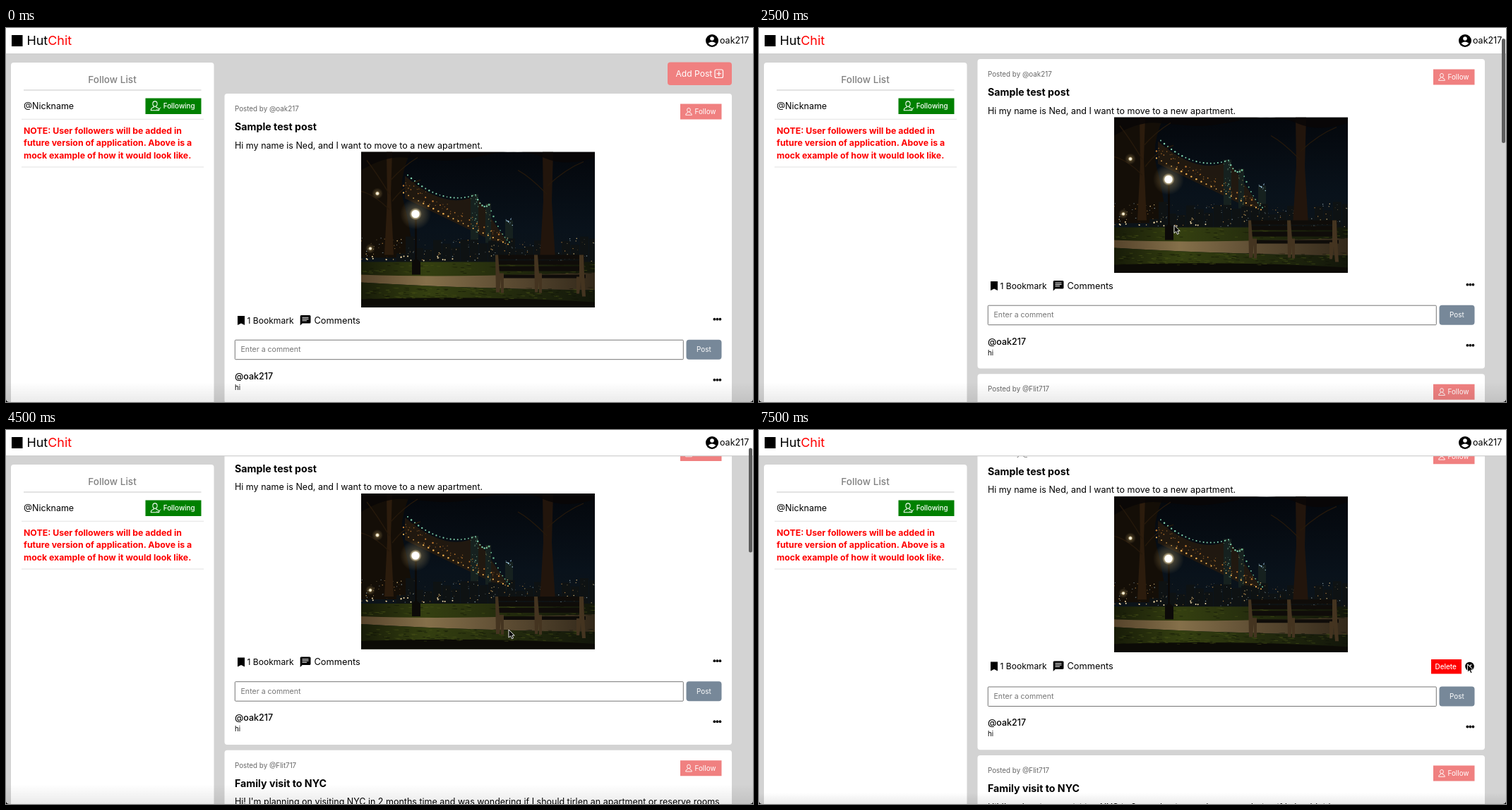
An HTML page for the animation above (8000 ms loop, 1058x530 px).

```html
<!DOCTYPE html>
<html lang="en">
<head>
<meta charset="utf-8">
<title>Apartment forum</title>
<style>
html, body { margin: 0; width: 100%; height: 100%; overflow: hidden; background: #d3d3d3; }
svg { display: block; }
text { font: 12.5px Inter, "Open Sans", sans-serif; }
.brand { font-size: 17.9px; }
.title { font-size: 14.2px; font-weight: 700; }
.note { font-size: 12.3px; font-weight: 700; fill: red; }
.by { font-size: 9.8px; fill: #666; }
.btn { font-size: 9.9px; fill: #fff; }
.mid { font-weight: 500; }
.line { fill: none; stroke: #fff; }
</style>
</head>
<body>
<svg width="1058" height="530" viewBox="0 0 1058 530">
  <defs>
    <linearGradient id="sky" x2="0" y2="1">
      <stop stop-color="#04070c"/><stop offset=".5" stop-color="#09121b"/><stop offset="1" stop-color="#101618"/>
    </linearGradient>
    <linearGradient id="path" x2="1" y2="0">
      <stop stop-color="#55432b"/><stop offset=".28" stop-color="#85704a"/>
      <stop offset=".6" stop-color="#5f4e34"/><stop offset="1" stop-color="#32281a"/>
    </linearGradient>
    <linearGradient id="lawn" x2="1" y2="0">
      <stop stop-color="#171b08"/><stop offset=".28" stop-color="#343f10"/><stop offset="1" stop-color="#12160a"/>
    </linearGradient>
    <radialGradient id="glow">
      <stop stop-color="#fff"/><stop offset=".22" stop-color="#fff4d0" stop-opacity=".9"/>
      <stop offset=".4" stop-color="#ffd98a" stop-opacity=".22"/><stop offset="1" stop-color="#ffd98a" stop-opacity="0"/>
    </radialGradient>
    <linearGradient id="shade" x2="0" y2="1">
      <stop stop-opacity="0"/><stop offset="1" stop-opacity=".08"/>
    </linearGradient>
    <clipPath id="frame"><rect width="331" height="220.5"/></clipPath>
    <g id="dots"><circle cx="-4" r="1.9"/><circle r="1.9"/><circle cx="4" r="1.9"/></g>
    <g id="person" class="line">
      <ellipse cy="-2.3" rx="2.4" ry="2.8"/>
      <path d="M-1.3 .2V1.4Q-4.4 2-4.4 4.8H4.4Q4.4 2 1.3 1.4V.2"/>
    </g>
    <g id="follow">
      <path fill="#f08080" d="M955 14.5h58.5v22H955z"/>
      <use href="#person" x="967" y="25.5" stroke-width=".9"/>
      <text class="btn" x="975.5" y="29">Follow</text>
    </g>
  </defs>

  <rect width="1058" height="530" fill="#d3d3d3"/>

  <g id="feed">
    <rect x="937" y="48.5" width="91" height="32.5" rx="4" fill="#f08080"/>
    <text x="948.5" y="69" fill="#fff" style="font-size:12.1px">Add Post</text>
    <rect class="line" x="1004" y="59" width="11.5" height="11.5" rx="2" stroke-width="1.2"/>
    <path class="line" d="M1009.75 61.5v6.5M1006.5 64.75h6.5" stroke-width="1.2"/>

    <rect id="card" x="309.5" y="93" width="718.5" height="438.5" rx="4" fill="#fff"/>
    <g transform="translate(0 93)">
      <text class="by" x="324" y="25">Posted by @oak217</text>
      <text class="title" x="324" y="52">Sample test post</text>
      <text x="324" y="77.5">Hi my name is Ned, and I want to move to a new apartment.</text>
      <use href="#follow"/>
    </g>

    <g transform="translate(503 175.5)" clip-path="url(#frame)">
      <rect width="331" height="220.5" fill="url(#sky)"/>
      <path d="M0 0H70Q52 40 60 70T75 150H0z" fill="#140e07"/>
      <path d="M62 34Q120 84 162 62Q174 78 200 118L214 130 190 128 62 66z" fill="#2c1d0d" opacity=".7"/>
      <path d="M155 60h11v66h-11zM176 73h8v56h-8zM204 97h11v40h-11z" fill="#16211f"/>
      <g id="city"></g>
      <path d="M0 156H331V180H0z" fill="url(#lawn)"/>
      <path d="M0 174Q120 179 331 171V196Q150 194 0 185z" fill="url(#path)"/>
      <path d="M0 185Q150 194 331 196V221H0z" fill="url(#lawn)"/>
      <path d="M0 209Q160 203 331 213V221H0z" fill="#0c0b06"/>
      <g id="grass"></g>
      <path d="M36 0h8l-2 60 4 86H33l4-80z" fill="#2c1c0d"/>
      <path d="M257 0h15l-2 70 5 82h-22l5-82z" fill="#22150c"/>
      <path d="M0 0H331V8Q290 22 258 8T180 4 110 12 60 8 0 26z" fill="#090706" opacity=".85"/>
      <g class="line" style="stroke:#26190b" stroke-width="1.3">
        <path d="M40 60Q22 30 8 12M42 40Q60 20 80 8M40 82Q18 60 0 56M44 70Q62 46 84 40M264 48Q290 24 315 14M263 60Q240 36 222 26"/>
      </g>
      <path d="M76 92h3v60l5 4v18H72v-18l4-4z" fill="#0c0a08"/>
      <circle cx="77" cy="88" r="22" fill="url(#glow)"/>
      <circle cx="77" cy="88" r="5.5" fill="#fff"/>
      <circle cx="23" cy="59" r="8" fill="url(#glow)"/>
      <circle cx="13" cy="137" r="7" fill="url(#glow)"/>
      <path d="M192 146h124v6H192zM192 154h124v6H192zM192 162h124v7H192zM194 174h124v5H194z" fill="#0f0c09"/>
      <path id="legs" d="M190 146h4l2 26h6v28h-4v-20l-2 19h-5zM245 146h5l2 26h4v28h-4v-18l-2 17h-4zM309 146h6l1 28 2 31h-5l-2-22-2 18h-4v-24h4z" fill="#443420"/>
    </g>

    <g id="actions">
      <path d="M328 408h10v13l-5-2.4-5 2.4z"/>
      <text x="341.5" y="418.5" style="font-size:12.1px">1 Bookmark</text>
      <path d="M418 407h12q1.5 0 1.5 1.5v8.500q0 1.5-1.5 1.5h-10.3l-3 3V408.500q0-1.5 1.3-1.5z"/>
      <path class="line" d="M419.5 410.3h9M419.5 412.5h9M419.5 414.7h6.5" stroke-width="1.1"/>
      <text x="436.5" y="418.5" style="font-size:12.8px">Comments</text>
      <use id="more" href="#dots" x="1007.4" y="412.7"/>
      <g id="menu">
        <path d="M952 404.5h43v20.5h-43z" fill="red"/>
        <text class="btn mid" x="957.5" y="418.3">Delete</text>
        <circle cx="1006.5" cy="414.5" r="6.3"/>
        <path class="line" d="M1004 412l5 5m0-5l-5 5" stroke-width="1.3"/>
      </g>
    </g>

    <g id="below">
      <rect x="324.3" y="442.2" width="635" height="27.5" rx="1" fill="#fff" stroke="#767676"/>
      <text x="332.5" y="459.3" fill="#757575" style="font-size:10.6px">Enter a comment</text>
      <rect x="963.5" y="441.7" width="50" height="28" rx="4" fill="#789"/>
      <text class="btn" x="978" y="459">Post</text>
      <text class="mid" x="324" y="497.5">@oak217</text>
      <text x="324" y="512.7" style="font-size:9.7px">hi</text>
      <use href="#dots" x="1007.4" y="498.7"/>

      <rect x="309.5" y="539.2" width="718.5" height="300" rx="4" fill="#fff"/>
      <g transform="translate(0 539.2)">
        <text class="by" x="324" y="25">Posted by @Flit717</text>
        <text class="title" x="324" y="52">Family visit to NYC</text>
        <text x="324" y="77.5">Hi! I'm planning on visiting NYC in 2 months time and was wondering if I should tirlen an apartment or reserve rooms</text>
        <text x="324" y="95.2">in a hotel. I plan on visiting all the tourist hot spots in the city, so I won't be home long. What should I do?</text>
        <use href="#follow"/>
      </g>
    </g>
  </g>

  <rect x="7" y="49" width="287.5" height="490" rx="4" fill="#fff"/>
  <text class="mid" x="150.5" y="78.3" text-anchor="middle" fill="#808080" style="font-size:13.6px">Follow List</text>
  <path d="M25 87.5h251.5v1H25z" fill="#c8c8c8"/>
  <text x="25" y="114.7">@Nickname</text>
  <path d="M197.5 99.5h79V122h-79z" fill="green"/>
  <use href="#person" transform="translate(211 110.5) scale(1.3)" stroke-width=".8"/>
  <path class="line" d="M213.5 115l2 2 3.5-4.5"/>
  <text class="btn mid" x="222.7" y="114.2">Following</text>
  <path d="M22 128.7h258v1H22zM22 196.5h258v1H22z" fill="#e2e2e2"/>
  <text class="note" x="25" y="149.5">NOTE: User followers will be added in</text>
  <text class="note" x="25" y="167.2">future version of application. Above is a</text>
  <text class="note" x="25" y="184.9">mock example of how it would look like.</text>

  <path d="M0 0h1058v37.2H0z" fill="#c4c4c4"/>
  <path d="M0 0h1058v36.3H0z" fill="#fff"/>
  <rect x="8" y="10" width="15.5" height="16"/>
  <text class="brand" x="29.5" y="24">Hut<tspan fill="red">Chit</tspan></text>
  <circle cx="1000" cy="18" r="9"/>
  <circle cx="1000" cy="15" r="2.8" fill="#fff"/>
  <path d="M994.6 21.8Q1000 17 1005.4 21.8Q1000 27.5 994.6 21.8z" fill="#fff"/>
  <text x="1011" y="22.2">oak217</text>

  <rect id="dock" width="1058" fill="url(#shade)"/>
  <path d="M0 526.5Q.5 529.5 4 530H0zM1058 526.5Q1057.5 529.5 1054 530H1058z"/>
  <rect id="thumb" x="1052" width="5" height="148" rx="2.5" fill="#5c5c5c"/>
  <path id="cursor" d="M0 0V11.2L2.7 8.8L4.5 12.8L6.5 11.9L4.8 8.1H8.2z" stroke="#fff" stroke-width=".9"/>
</svg>
<script>
const $ = id => document.getElementById(id);
const move = (id, x, y) => $(id).setAttribute('transform', `translate(${x} ${y})`);
const show = (id, alpha) => $(id).setAttribute('opacity', +alpha);

// City windows, the strings of lights on the bridge, and the lawn texture
let seed = 7;
const rand = () => (seed = seed * 16807 % 2147483647) / 2147483647;
const dot = (x, y, r, color) => `<circle cx="${x}" cy="${y}" r="${r}" fill="${color}"/>`;
const many = (n, make) => Array.from({ length: n }, (_, i) => make(i)).join('');
const cable = (x0, y0, x1, y1, sag, n, color) => many(n + 1, i => {
  const u = i / n;
  return dot(x0 + (x1 - x0) * u, y0 + (y1 - y0) * u + 4 * sag * u * (1 - u), .8 + rand() * .5, color);
});
const tower = (x, y, w, h, n, color) =>
  many(n, () => dot(x + rand() * w, y + rand() * h, .4 + rand() * .4, color));

$('city').innerHTML =
  many(22, i => {
    const h = 12 + rand() * 26;
    return `<path d="M${50 + i * 13} ${156 - h}h12v${h}h-12z" fill="#0e1213"/>`;
  }) +
  many(170, i => dot(rand() * 331, 122 + rand() * 33, .3 + rand() * .5, ['#d9b878', '#7d929a', '#a8783a'][i % 3])) +
  tower(155, 60, 11, 60, 22, '#5f8a70') +
  tower(176, 74, 8, 50, 16, '#8a8a55') +
  tower(204, 94, 11, 10, 10, '#b4e0ff') +
  many(16, () => dot(rand() * 130, 148 + rand() * 7, 1, '#f3dca8')) +
  many(45, () => {
    const u = rand();
    return dot(62 + 146 * u, 48 + 80 * u + rand() * 16 - 8, .5 + rand() * .4, '#8a5a24');
  }) +
  cable(66, 33, 162, 61, 15, 19, '#7fd0ac') +
  cable(162, 61, 181, 75, 8, 6, '#7fd0ac') +
  cable(181, 75, 210, 128, 7, 9, '#68b890') +
  cable(60, 58, 208, 131, 2, 21, '#f0b050') +
  cable(60, 48, 195, 117, 1, 13, '#b8742e');

$('grass').innerHTML = many(220, i => {
  const y = i % 3 ? 192 + rand() * 17 : 158 + rand() * 14;
  return `<path d="M${rand() * 331} ${y}h${3 + rand() * 7}v1h-4z" fill="${i % 2 ? '#4a5518' : '#0e1206'}" opacity=".55"/>`;
});

// [time, scroll, cursor x, cursor y, scrollbar opacity]
const steps = [
  [0, 0, -20, -20, 0], [750, 0, 497, 85, 0], [1250, 0, 587, 268, 0], [1500, 0, 588, 279.5, 0],
  [1750, 17.5, 588, 279.5, 1], [2000, 31.7, 588, 279.5, 1], [2250, 42, 588, 279.5, 1],
  [2500, 49, 588, 279.5, 1], [2750, 66.5, 588, 279.5, 1], [3000, 94.3, 588, 279.5, 1],
  [3250, 111.3, 588, 279.5, 1], [3750, 111.3, 712, 283, .5], [4000, 111.3, 712, 283, 0],
  [4250, 97.7, 712, 283, 1], [4500, 85.5, 712, 283, 1], [5000, 81.2, 712, 283, 1],
  [5250, 81.2, 985.5, 345, 1], [5500, 81.2, 1001, 355, .5], [5750, 81.2, 1004, 335.5, 0],
  [6500, 81.2, 1003.5, 334.5, 0], [7000, 81.2, 1003.5, 332, 0]
];

function draw(now) {
  const t = now % 8000;
  const [, scroll, x, y, bar] = steps.findLast(s => s[0] <= t);
  const open = t >= 7500;
  const dockHeight = t < 6500 ? 28 : 16;
  move('feed', 0, -scroll);
  move('cursor', x, y);
  move('thumb', 0, .9 + scroll * .2875);
  show('thumb', bar);
  show('menu', open);
  show('more', !open);
  move('actions', 0, open ? 1.7 : 0);
  move('below', 0, open ? 3 : 0);
  $('card').setAttribute('height', open ? 441.5 : 438.5);
  $('dock').setAttribute('y', 530 - dockHeight);
  $('dock').setAttribute('height', dockHeight);
  requestAnimationFrame(() => draw(performance.now() - start));
}
const start = performance.now();
draw(0);
</script>
</body>
</html>
```
